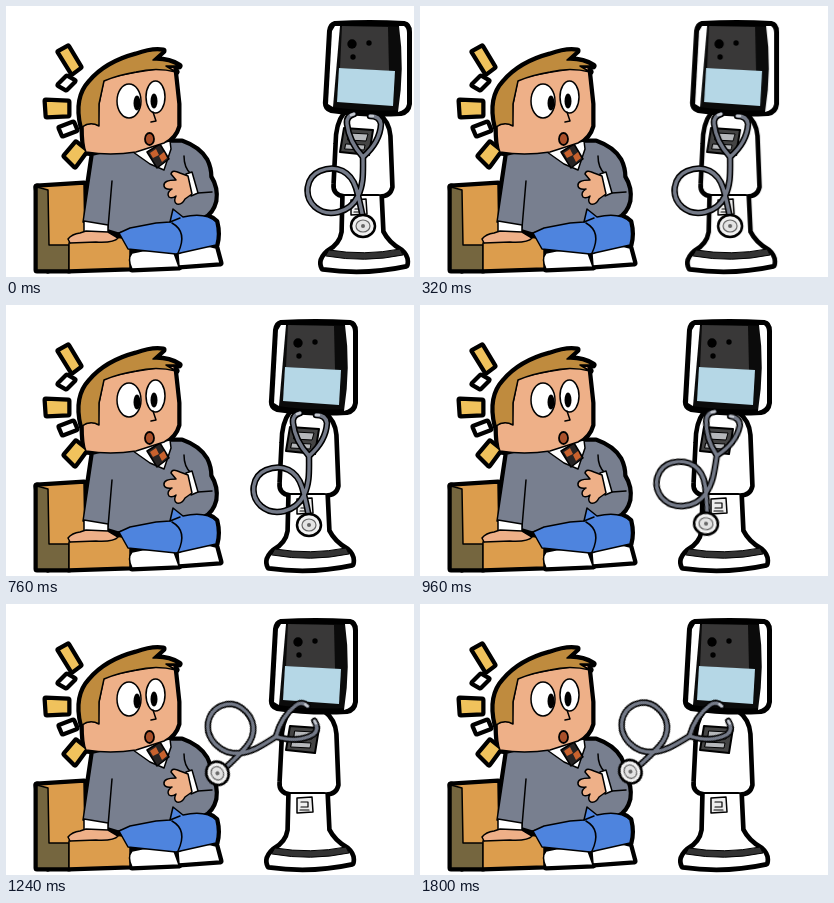
Write an HTML page that moves like this. It is 408x271 px and loops after 2280 ms.

```html
<!DOCTYPE html>
<html lang="en">
<head>
<meta charset="utf-8">
<title>Robot check-up</title>
<style>
  html, body { margin: 0; width: 100%; height: 100%; overflow: hidden; background: #fff; }
  svg { display: block; width: 100vw; height: 100vh; }
  .ink { stroke: #000; stroke-linejoin: round; stroke-linecap: round; }
  .line { fill: none; }
  .skin { fill: #eeb088; }
  .hair { fill: #bf8b3e; }
  .coat { fill: #787f8f; }
  .jeans { fill: #4e84de; }
  .white { fill: #fff; }
  .wood { fill: #dc9d4d; }
  .spark { fill: #f0c25c; }
  .robot, .scope { animation: 2280ms cubic-bezier(.45, 0, .55, 1) infinite; }
  .robot { animation-name: glide; }
  .scope { animation-name: swing; transform-origin: 303px 112px; }
  @keyframes glide {
    0%, 3.5% { transform: translateX(54px); }
    17.8%, 100% { transform: none; }
  }
  @keyframes swing {
    0%, 36.6% { transform: rotate(0deg); }
    56.4%, 100% { transform: rotate(59deg); }
  }
</style>
</head>
<body>
<svg viewBox="0 0 408 271">
  <defs>
    <g id="sparks">
      <path class="spark" d="M53 46 62 41 74 61 66 67Z"/>
      <path class="white" d="M53 79 61 71 68 75 60 83Z"/>
      <path class="spark" d="M40 95 62 96 62 109 41 110Z"/>
      <path class="white" d="M54 122 67 117 70 124 57 129Z"/>
      <path class="spark" d="M59 150 70 137 80 145 69 160Z"/>
    </g>

    <g id="chair">
      <path class="wood" d="M31 181 78 178 79 240 42 264Z"/>
      <path fill="#75663f" d="M31 181 42 184 43 239 63 239 63 264 31 264Z"/>
      <path class="wood" d="M63 237 86 228 124 233 124 262 63 264Z"/>
    </g>

    <g id="man">
      <path class="white" d="M172 248Q192 236 210 242L214 257 173 260Z"/>
      <path class="white" d="M126 247Q148 241 168 247L173 261 126 263Q121 253 126 247Z"/>
      <path class="coat" d="M87 149 126 139 160 136 176 136Q193 142 200 154 204 162 204 171 211 182 209 195 206 207 197 211L176 214 164 218 112 227 102 224 77 216Z"/>
      <path class="line" d="M106 175 102 222M178 150Q178 162 185 168M192 187 206 186"/>
      <path class="jeans" d="M113 227 124 222 150 217 164 216 167 203 177 211Q200 206 210 216 213 228 210 239L170 248 122 243Z"/>
      <path class="line" d="M166 217Q182 226 172 247M164 216 174 212"/>
      <path class="white" d="M78 215 102 219 102 229 78 226Z"/>
      <path class="skin" d="M62 233Q66 228 74 227L80 225 102 226 112 232Q108 237 90 236L64 237Z"/>
      <path class="white" d="M180 168 186 166 192 187 185 190Z"/>
      <path class="skin" d="M182 170 174 167Q166 163 165 168L170 174Q157 174 158 180 159 184 166 183 160 187 163 191 166 193 170 190 167 196 171 198 176 199 179 193L186 188Z"/>
      <path class="white" d="M120 141 148 138 164 135 165 143 158 164 144 158Z"/>
      <path fill="#262323" d="M141 146 154 138 163 153 151 162Z"/>
      <path class="skin" d="M77 120Q85 115 92 119L93 98 98 73Q130 65 168 61L172 98 172 120Q169 131 158 137L130 146Q104 150 80 146 77 140 77 120Z"/>
      <path class="hair" d="M76 121Q69 92 84 76 100 57 130 49 147 43 157 45L147 54Q162 53 173 60L160 60 170 66Q150 61 130 66 112 69 98 75L93 98 93 120Q84 115 76 121Z"/>
      <ellipse class="white" cx="123" cy="95" rx="12" ry="17"/>
      <ellipse class="white" cx="149.500" cy="91" rx="9.500" ry="16"/>
    </g>

    <g id="body">
      <path class="white" d="M284 184 320 184 322 226Q328 238 341 245 348 251 346 259 305 268 263 262 259 254 268 246 281 239 283 226Z"/>
      <path class="white" d="M285 108 317 108Q328 116 329 130L331 181Q329 190 318 189L284 189Q274 188 275 178L277 138Q277 118 285 108Z"/>
    </g>

    <path id="head" d="M275 18Q310 16 344 18 349 19 349 26L349 98Q348 106 341 107 305 109 271 104 265 102 266 95L270 25Q271 19 275 18Z"/>

    <g id="tube">
      <path d="M294 108Q286 110 287 118 289 136 303 151 320 136 321 118 320 110 310 110"/>
      <path d="M303 150C303 165 304 178 298 190 290 207 268 212 255 201 243 190 246 171 260 165 277 158 291 166 296 182 299 192 301 202 303 212"/>
    </g>
  </defs>

  <g class="ink">
    <g stroke-width="7">
      <use href="#sparks"/><use href="#chair"/><use href="#man"/>
    </g>
    <g stroke-width="1.5">
      <use href="#sparks"/><use href="#chair"/><use href="#man"/>
    </g>
    <path class="line" stroke-width="1.5" d="M147 106 150 115 145 116"/>
    <ellipse cx="131" cy="97" rx="3.500" ry="7.500" stroke="none"/>
    <ellipse cx="148" cy="95" rx="3.500" ry="7.500" stroke="none"/>
    <ellipse cx="143.500" cy="133" rx="4.500" ry="6" fill="#a9502a" stroke-width="1.8"/>
    <path fill="#c8622e" stroke="none" d="M144 147 150 143 153 149 147 152ZM153 150 158 146 161 152 156 156Z"/>
  </g>

  <g class="robot ink">
    <use href="#body" stroke-width="7.500"/>
    <use href="#body" stroke-width="1.8"/>
    <path fill="#333" stroke-width="1" d="M269 244Q305 250 340 243L343 249Q305 257 266 250Z"/>
    <path fill="#444" stroke-width="2" d="M284 122 313 124 309 149 280 146Z"/>
    <path fill="#b5b7ba" stroke-width="1" d="M289 127 308 128 306 135 288 134ZM286 138 305 139 304 144 285 143Z"/>
    <path fill="#eee" stroke-width="1.5" d="M291 194 306 193 307 208 291 209Z"/>
    <path class="line" stroke-width="1.2" d="M295 198H302V203H295M294 206H303"/>

    <use href="#head" fill="#0b0b0b" stroke-width="6"/>
    <g stroke="none">
      <path class="white" d="M275 20 280 20 273 101 268 98 272 25Z"/>
      <path class="white" d="M339 20 344 20Q347 22 347 27L347 98Q346 104 338 106 345 62 339 20Z"/>
      <path fill="#393838" d="M282 20 328 21 329 65 280 62Z"/>
      <path fill="#b5d7e6" d="M279 62 335 65 333 100 277 96Z"/>
      <circle cx="292" cy="38" r="4.700"/>
      <circle cx="309" cy="37" r="2.700"/>
      <circle cx="293" cy="51" r="2.700"/>
    </g>

    <g class="scope">
      <use href="#tube" fill="none" stroke-width="6.500"/>
      <use href="#tube" fill="none" stroke="#747a88" stroke-width="3.400"/>
      <path class="line" stroke="#c4c8cf" stroke-width="2.500" d="M294 108 291 109M310 110 313 110"/>
      <ellipse cx="303" cy="220" rx="12" ry="11" fill="#f2f2f2" stroke-width="2.500"/>
      <ellipse cx="303" cy="220" rx="7" ry="6" fill="#e4e4e4" stroke="#666" stroke-width="1.2"/>
      <circle cx="303" cy="220" r="2" fill="#666" stroke="none"/>
    </g>
  </g>
</svg>
</body>
</html>
```
